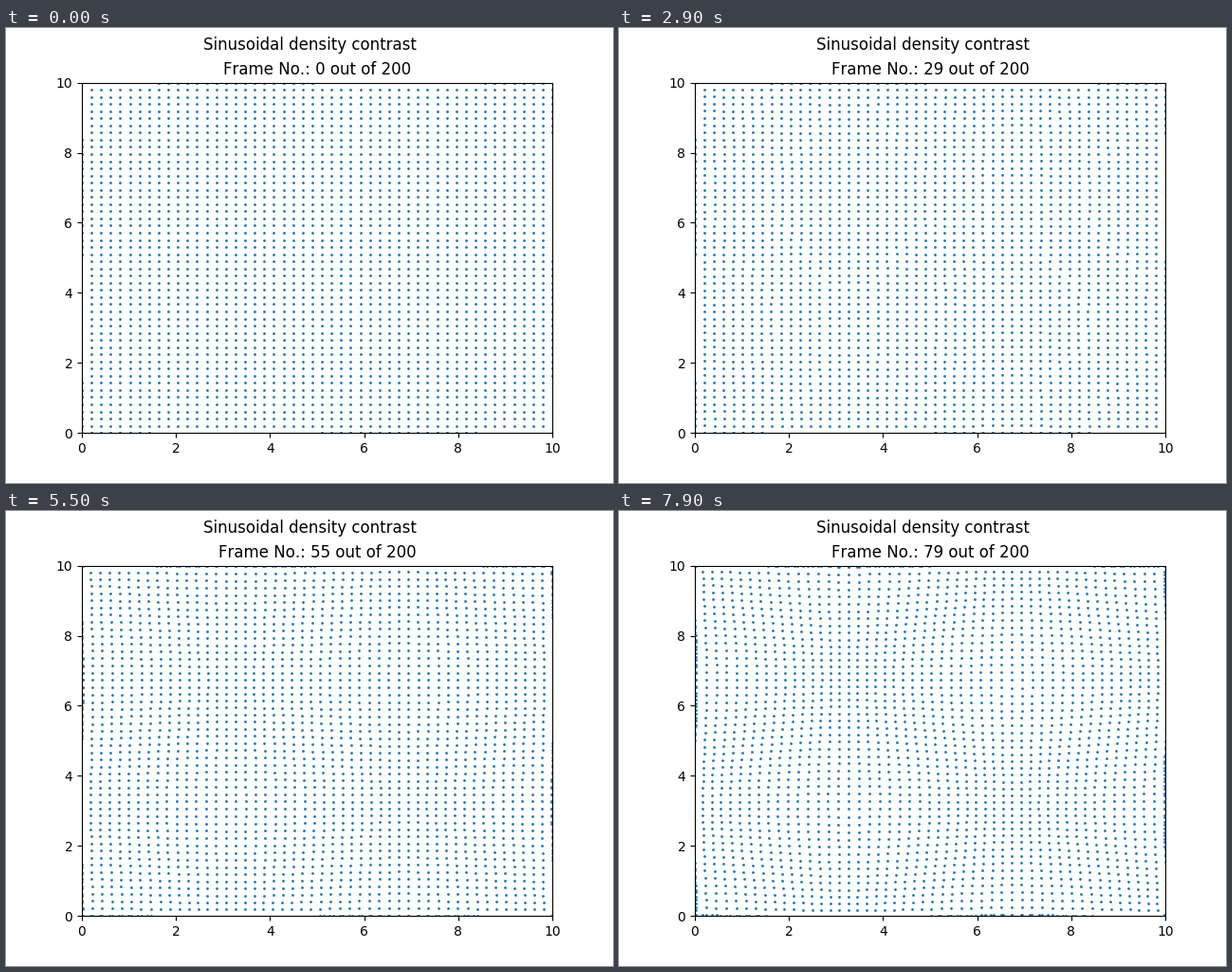
A matplotlib script for the animation above (8000 ms loop, 640 by 480 pixels).

```python
import numpy as np
import matplotlib.pyplot as plt
from matplotlib.animation import FuncAnimation

plt.rcParams["text.kerning_factor"] = 6

SIZE = 10.0
SIDE = 50
FRAMES = 80
TOTAL = 200
PX = SIZE / 496
REACH = 4.1 * PX
K = 0.88

axis = np.linspace(0, SIZE, SIDE)
X, Y = (g.ravel() for g in np.meshgrid(axis, axis))


def pull(u, v):
    """Displacement along u at the end of the loop."""
    mid = SIZE / 2
    return -REACH * np.cos(K * (u - mid)) * np.sin(K * (v - mid))


DX, DY = pull(X, Y), pull(Y, X)


def positions(i):
    growth = 1e-4 + (i / (FRAMES - 1)) ** 2
    return (X + growth * DX) % SIZE, (Y + growth * DY) % SIZE


fig, ax = plt.subplots(figsize=(6.4, 4.8), dpi=100)
fig.suptitle("Sinusoidal density contrast", y=0.982)
ax.set_xlim(0, SIZE)
ax.set_ylim(0, SIZE)
dots, = ax.plot([], [], "o", color="tab:blue", markersize=1)
title = ax.set_title("")


def update(i):
    dots.set_data(*positions(i))
    title.set_text(f"Frame No.: {i} out of {TOTAL}")
    return dots, title


anim = FuncAnimation(fig, update, frames=FRAMES, interval=100,
                     repeat=True, repeat_delay=0, blit=False)
plt.show()
```
